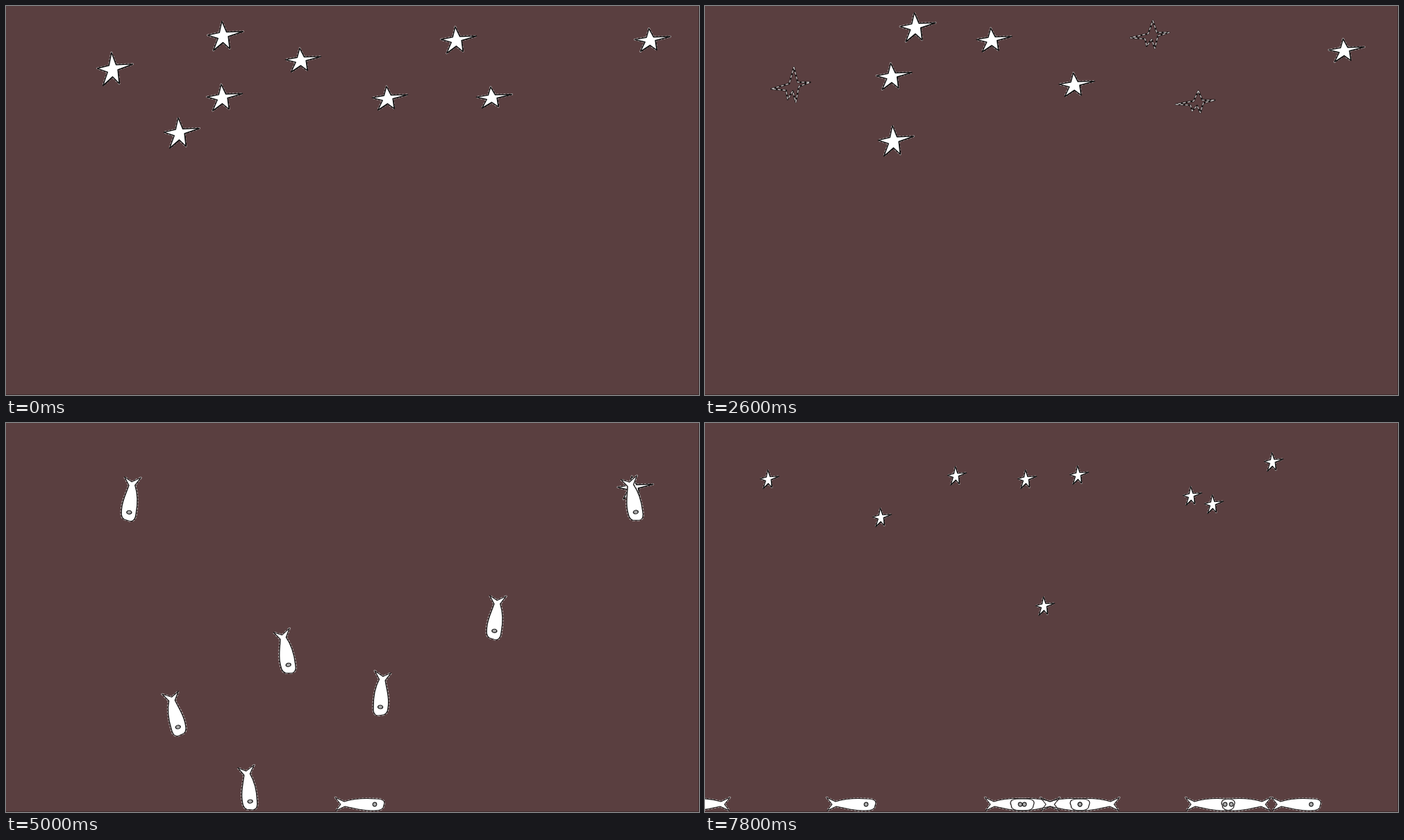
Animation, 998 px wide and 561 px high, one loop 8 s. Source, as an HTML page with a canvas:

```html
<!DOCTYPE html>
<html lang="en">
<head>
<meta charset="utf-8">
<title>Stars and fish</title>
<style>
html, body { margin: 0; width: 100%; height: 100%; overflow: hidden; background: #5a3f40; }
canvas { display: block; }
</style>
</head>
<body>
<canvas id="stage" width="998" height="561"></canvas>
<script>
const ctx = document.getElementById('stage').getContext('2d');
const LOOP = 8000, STEP = 200;
const FLOOR = 550, FALL_SPEED = .33;
const SWIM_START = 7200, SWIM_END = 7800;
const WAYPOINT_TIMES = [0, 1800, 3400, 4400];

const mix = (a, b, p) => a + (b - a) * p;
const clamp = p => Math.min(1, Math.max(0, p));

// Shapes in a unit box, as x,y pairs
const SHAPES = {
  star: [.4, 0, .53, .37, 1, .35, .58, .52, .62, .94, .43, .73, .16, 1, .29, .59, 0, .48, .33, .39],
  sketch: [.58, 0, .68, .43, 1, .43, .71, .55, .63, 1, .55, .68, .42, .92, .38, .66, 0, .62, .46, .47],
  round: Array.from({ length: 10 }, (_, i) => {
    const a = i * Math.PI / 5, r = i % 2 ? .3 : .52;
    return [.5 + r * Math.sin(a), .52 - r * Math.cos(a)];
  }).flat()
};

// Each star wanders past its points, drops as a fish at `drop`, rests at `land`, then swims
const actors = [
  { points: [[157, 91], [129, 100], [118, 127]], tall: 1.25, sketch: [900, 3500],
    drop: [4200, 272, 156], land: 132, facing: -1, swim: -132 },
  { points: [[316, 43], [310, 33], [303, 28], [316, 29]], tall: 1.1,
    drop: [5000, 179, 110], land: 211, facing: 1, swim: 0 },
  { points: [[428, 78], [428, 55], [405, 43], [484, 102]], tall: .9,
    drop: [4600, 402, 200], land: 440, facing: 1, swim: 79, rest: 11 },
  { points: [[315, 132], [280, 102], [265, 101]], tall: 1,
    drop: [4000, 340, 197], land: 352, facing: 1, swim: 87 },
  { points: [[253, 183], [243, 180], [307, 209]], tall: 1.15, sketch: [900, 2500],
    drop: [3600, 506, 200], land: 510, facing: 1, swim: -35 },
  { points: [[553, 133], [544, 114], [527, 113]], tall: .9, sketch: [900, 2500],
    drop: [4200, 536, 131], land: 566, facing: -1, swim: -5, rest: 17 },
  { points: [[652, 49], [657, 44], [624, 38], [634, 44]], tall: 1, sketch: [2600, 3900],
    drop: [5000, 903, 110], land: 785, facing: 1, swim: 67, rest: -4 },
  { points: [[703, 132], [712, 128], [700, 148], [705, 153]], tall: .8, sketch: [900, 3900],
    drop: [4800, 705, 215], land: 700, facing: 1, swim: 28 },
  { points: [[931, 49], [915, 57], [933, 71], [933, 70]], tall: .87,
    drop: [6000, 862, 132], land: 830, facing: -1, swim: -51, rest: 4 }
];

// New stars: top position and time of leaving the floor
const risers = [
  [93, 81, 6550], [363, 76, 6740], [539, 75, 6760], [702, 105, 6820], [819, 56, 6850],
  [255, 136, 7050], [464, 81, 7050], [733, 117, 7050], [490, 264, 7300]
];

function starAt({ points, tall, sketch = [0, 0], drop }, time) {
  const keys = [...points.map((p, i) => [WAYPOINT_TIMES[i], ...p]), drop];
  const next = keys.findIndex(k => k[0] > time);
  const [t0, x0, y0] = keys[next - 1], [t1, x1, y1] = keys[next];
  const p = (time - t0) / (t1 - t0);
  const place = { x: mix(x0, x1, p), y: mix(y0, y1, p) };
  if (time >= drop[0] - 400) return { ...place, w: 38, h: 45, look: 'morph' };
  if (time >= sketch[0] && time < sketch[1])
    return { ...place, w: 58, h: 42 * tall, look: 'sketch' };
  return { ...place, w: 52, h: 39 * tall, look: 'star' };
}

function fishAt({ drop: [start, column, top], land, facing, swim, rest = 0 }, time, index) {
  const fall = clamp((time - start) * FALL_SPEED / (FLOOR - top));
  const swum = clamp((time - SWIM_START) / (SWIM_END - SWIM_START));
  const lean = index % 2 ? 5 : -12;
  const restAngle = rest * (1 - swum);
  return {
    x: mix(column, land, fall ** 4) + swim * swum,
    y: mix(top, FLOOR - Math.abs(restAngle) * .4, fall),
    angle: mix(facing * 90 + lean, restAngle, fall ** 30),
    facing: swum > 0 && swim ? Math.sign(swim) : facing
  };
}

function riserAt([x, y, birth], time) {
  const p = clamp((time - birth) / (SWIM_END - birth));
  const w = 9 + 19 * p;
  return { x: x + 10 * (1 - p), y: mix(FLOOR, y, p), w, h: w * mix(.7, 1, p), look: p < .5 ? 'round' : 'star' };
}

function outline(points, x, y, w, h) {
  const path = new Path2D();
  for (let i = 0; i < points.length; i += 2)
    path.lineTo(x + (points[i] - .5) * w, y + (points[i + 1] - .5) * h);
  path.closePath();
  return path;
}

function stroke(path, color, width, dash = []) {
  ctx.setLineDash(dash);
  ctx.strokeStyle = color;
  ctx.lineWidth = width;
  ctx.stroke(path);
}

function fill(path, color) {
  ctx.fillStyle = color;
  ctx.fill(path);
}

function inkedStar(shape, x, y, w, h) {
  const path = outline(SHAPES[shape], x, y, w, h);
  const ink = Math.min(1.4, w / 22);
  stroke(path, '#bdb6b6', ink * 2, [3, 2]);
  fill(outline(SHAPES[shape], x + ink * .7, y + ink * .4, w, h), '#000');
  fill(path, '#fff');
  stroke(path, '#111', ink);
}

function drawStar({ x, y, w, h, look }) {
  if (look === 'sketch') {
    const path = outline(SHAPES.sketch, x, y, w - 2, h - 2);
    stroke(path, '#1a1616', 2.4);
    stroke(path, '#cbc5c5', 1.3, [4, 3]);
  } else if (look === 'morph') {
    inkedStar('round', x, y, w, h);
    inkedStar('star', x + 2, y + h * .14, w * .8, h * .6);
  } else {
    inkedStar(look, x, y, w - 1, h - 1);
  }
}

const body = new Path2D('M-36-10 L-23-4 C-10-8 8-9 22-8 C30-8 35-6 35-2 L33 5 ' +
  'C30 9 24 9 16 9 C2 9-10 5-22 3 L-35 9 L-28 0 Z');
const eye = new Path2D();
eye.arc(21, 0, 2.8, 0, Math.PI * 2);

function onFish({ x, y, angle, facing }, paint) {
  ctx.save();
  ctx.translate(x, y);
  ctx.rotate(angle * Math.PI / 180);
  if (Math.abs(angle) > 45) ctx.scale(.9, 1.25);
  ctx.scale(facing, 1);
  paint();
  ctx.restore();
}

function fishBody() {
  stroke(body, '#bdb6b6', 2.6, [3, 2]);
  fill(body, '#fff');
}

function fishLines() {
  stroke(body, '#1a1717', 1.1);
  fill(eye, '#aaa');
  stroke(eye, '#222', 1.2);
}

function draw(time) {
  ctx.fillStyle = '#5a3f40';
  ctx.fillRect(0, 0, 998, 561);
  ctx.fillStyle = '#3f2c2d';
  ctx.fillRect(997, 0, 1, 561);
  ctx.fillRect(0, 560, 998, 1);
  ctx.lineJoin = 'round';

  const shoal = [];
  actors.forEach((actor, i) => {
    if (time < actor.drop[0]) drawStar(starAt(actor, time));
    else shoal.push(fishAt(actor, time, i));
  });
  risers.filter(r => time > r[2]).forEach(r => drawStar(riserAt(r, time)));

  // Lines go on last so that overlapping fish show through each other
  shoal.forEach(f => onFish(f, fishBody));
  shoal.forEach(f => onFish(f, fishLines));
}

const start = performance.now();
function tick() {
  const time = (performance.now() - start) % LOOP;
  draw(Math.floor(time / STEP) * STEP);
  requestAnimationFrame(tick);
}
tick();
</script>
</body>
</html>
```
